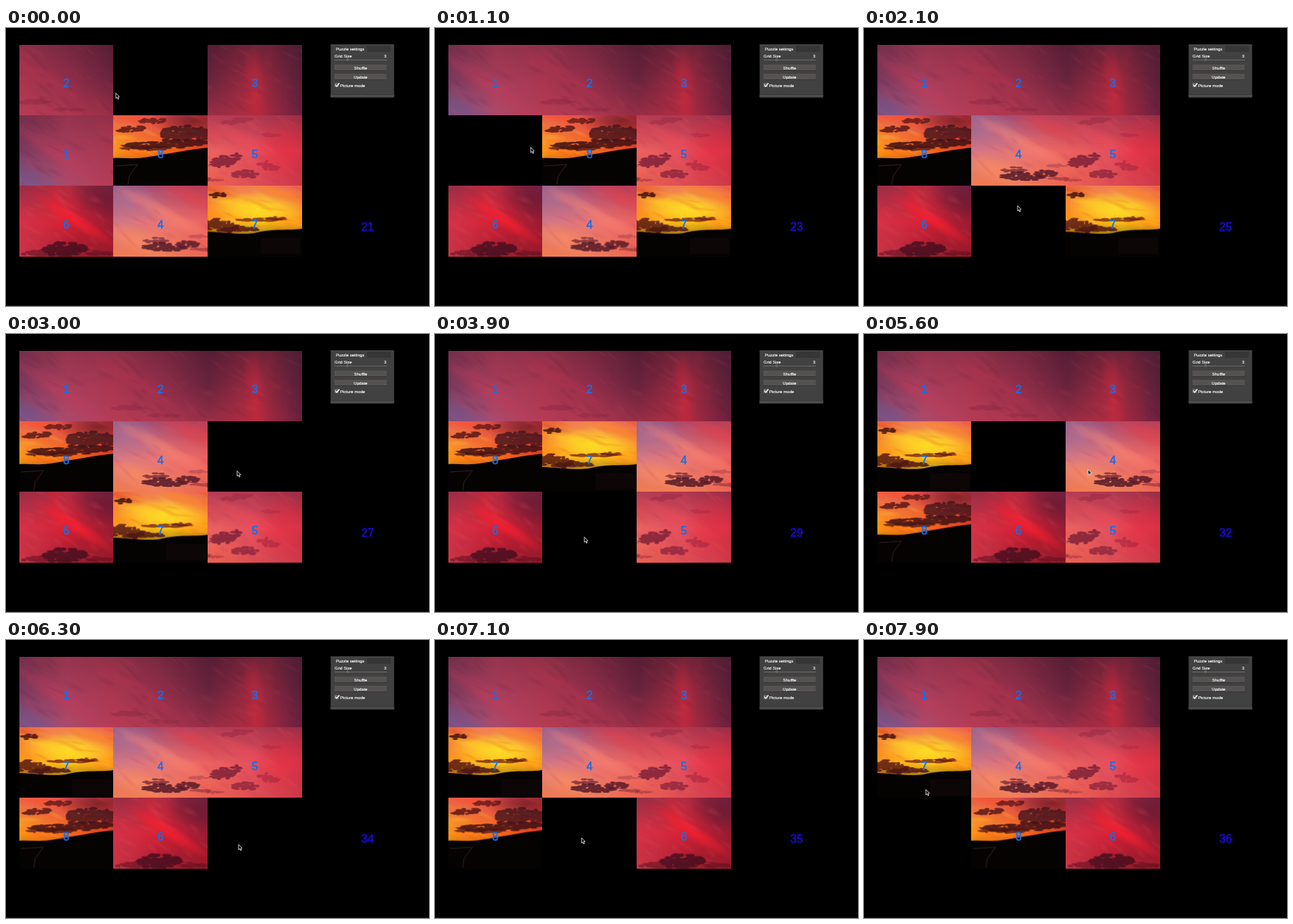
An HTML page with a canvas for the animation above (8000 ms loop, 600 by 395 pixels).

```html
<!DOCTYPE html>
<html lang="en">
<head>
<meta charset="utf-8">
<title>Sliding puzzle</title>
<style>
  html, body { margin: 0; width: 100%; height: 100%; overflow: hidden; background: #000; }
  canvas { display: block; width: 600px; height: 395px; }
</style>
</head>
<body>
<canvas id="stage" width="600" height="395"></canvas>
<script>
const LOOP = 8000, STEP = 100;
const COLS = [18.5, 152, 286, 419.5], ROWS = [23.5, 124, 224, 324.5];
const TW = 400 / 3, TH = 100;
const FONT = '"Liberation Sans", Arial, sans-serif';
const ctx = document.getElementById('stage').getContext('2d');

// Tile number in each cell, 0 is the hole
const START = [2, 0, 3, 1, 8, 5, 6, 4, 7];
const FIRST_COUNT = 21;
// [time, tile that slides into the hole]
const MOVES = [
  [500, 2], [1000, 1], [1500, 8], [2000, 4], [2500, 7], [2900, 5], [3400, 4], [3800, 7],
  [4300, 6], [4700, 8], [5200, 7], [5700, 4], [6200, 5], [6900, 6], [7500, 8]
];
// Pointer tip: [time, x, y]
const PATH = [
  [0, 156, 92], [400, 118, 96], [600, 118, 100], [900, 134, 160], [1100, 136, 169],
  [1400, 190, 188], [1600, 200, 196], [1900, 216, 246], [2100, 218, 252],
  [2400, 318, 262], [2600, 326, 258], [2850, 334, 198], [3000, 328, 194],
  [3300, 246, 188], [3500, 236, 196], [3750, 214, 274], [3900, 212, 288],
  [4200, 126, 286], [4400, 116, 274], [4650, 122, 202], [4900, 175, 203],
  [5200, 204, 200], [5600, 318, 192], [5800, 328, 204], [6100, 332, 276],
  [6300, 330, 290], [6500, 322, 288], [6850, 240, 282], [7050, 224, 282],
  [7400, 112, 272], [7600, 104, 262], [7900, 88, 212]
];

function makeRandom(seed) {
  return () => (seed = (seed * 16807) % 2147483647) / 2147483647;
}

function makeCanvas(w, h) {
  const c = document.createElement('canvas');
  c.width = w;
  c.height = h;
  return c;
}

function paintSunset() {
  const pic = makeCanvas(400, 300), g = pic.getContext('2d');
  const rnd = makeRandom(4711);

  // Coarse sky colours, one row every 50px, smoothed when enlarged
  const sky = [
    '#74304a #96344e #8e3048 #762840 #561e34 #74243a #4c1e34',
    '#7c3a60 #a83e5c #aa3650 #922e4a #6a243e #a22a40 #542038',
    '#8a5c88 #ac4a6c #b63c54 #b03850 #982e46 #b42c40 #6a2040',
    '#d0788a #ea7674 #ec6260 #e44e5c #d83448 #d42034 #941c32',
    '#f47c4c #f07e58 #ec6450 #dc4c54 #cc3848 #9c1c30 #9c1828',
    '#ff9814 #ffc818 #ffa018 #fa6c18 #e03a18 #9a2018 #702020',
    '#000 #000 #000 #000 #000 #000 #000'
  ];
  const tiny = makeCanvas(7, 7), tg = tiny.getContext('2d');
  sky.forEach((row, y) => row.split(' ').forEach((col, x) => {
    tg.fillStyle = col;
    tg.fillRect(x, y, 1, 1);
  }));
  g.drawImage(tiny, -200 / 6, -25, 2800 / 6, 350);

  function glow(x, y, rx, ry, deg, rgb, a) {
    g.save();
    g.translate(x, y);
    g.rotate(deg * Math.PI / 180);
    g.scale(rx, ry);
    const f = g.createRadialGradient(0, 0, 0, 0, 0, 1);
    f.addColorStop(0, `rgba(${rgb},${a})`);
    f.addColorStop(0.5, `rgba(${rgb},${a * 0.55})`);
    f.addColorStop(1, `rgba(${rgb},0)`);
    g.fillStyle = f;
    g.fillRect(-1, -1, 2, 2);
    g.restore();
  }

  // Soft ragged bank of small flat puffs, denser towards its centre line
  function cloud(x, y, w, h, rgb, a, tilt = 0) {
    const n = 14 + w * h / 14;
    g.filter = 'blur(0.7px)';
    g.fillStyle = `rgba(${rgb},${a})`;
    g.beginPath();
    for (let i = 0; i < n; i++) {
      const u = rnd() * 2 - 1;
      const v = (rnd() + rnd() - 1) * Math.sqrt(1 - u * u);
      const rx = 2 + rnd() * (1 + w * 0.07), ry = 0.8 + rnd() * h * 0.1;
      const px = x + u * w / 2, py = y + v * h / 2 + u * tilt;
      g.moveTo(px + rx, py);
      g.ellipse(px, py, rx, ry, 0, 0, 7);
    }
    g.fill();
    g.filter = 'none';
  }

  // Fine wisps that follow the drift of the sky
  function wisps(n, y0, h, deg, colors, a) {
    for (let i = 0; i < n; i++) {
      const x = rnd() * 400, y = y0 + rnd() * h;
      glow(x, y, 8 + rnd() * 16, 2 + rnd() * 3, deg + rnd() * 25, colors[i % colors.length], a);
    }
  }

  function clipRow(i, draw) {
    g.save();
    g.beginPath();
    g.rect(0, i * TH, 400, TH);
    g.clip();
    draw();
    g.restore();
  }

  clipRow(0, () => {
    glow(60, 58, 95, 16, 34, '196,60,90', 0.5);
    glow(16, 92, 55, 20, 22, '106,80,140', 0.5);
    glow(160, 40, 80, 14, 32, '186,52,80', 0.4);
    glow(334, 62, 18, 60, -6, '206,40,60', 0.55);
    glow(352, 35, 12, 50, 8, '150,40,60', 0.35);
    wisps(90, 0, 100, 20, ['210,66,92', '76,24,56'], 0.13);
    cloud(155, 81, 46, 9, '120,32,60', 0.3);
    cloud(205, 92, 40, 7, '120,32,60', 0.25);
  });

  clipRow(1, () => {
    glow(30, 118, 60, 24, 25, '180,120,160', 0.55);
    glow(75, 140, 90, 14, 28, '255,136,112', 0.55);
    glow(30, 175, 60, 20, 18, '255,146,100', 0.6);
    glow(110, 115, 55, 16, 25, '232,62,74', 0.55);
    glow(195, 140, 65, 14, 25, '246,76,90', 0.45);
    glow(240, 150, 40, 50, 20, '228,40,60', 0.5);
    glow(345, 148, 75, 12, 32, '255,32,48', 0.75);
    glow(320, 125, 14, 45, -12, '232,36,54', 0.45);
    glow(380, 118, 42, 26, 30, '90,22,46', 0.5);
    glow(280, 175, 40, 30, 0, '196,44,64', 0.5);
    wisps(90, 100, 100, 20, ['250,90,96', '180,50,90'], 0.14);
    cloud(174, 108, 40, 10, '150,40,66', 0.5, -3);
    cloud(222, 128, 26, 6, '166,40,66', 0.45);
    cloud(159, 163, 40, 20, '112,26,52', 0.75, -4);
    cloud(186, 184, 36, 13, '122,28,54', 0.65);
    cloud(220, 172, 28, 14, '160,36,62', 0.55, 3);
    cloud(142, 192, 20, 5, '150,40,62', 0.5);
    cloud(122, 172, 26, 5, '166,60,80', 0.5);
    cloud(60, 178, 30, 9, '106,32,50', 0.7);
    cloud(72, 187, 58, 14, '72,18,36', 0.8);
    cloud(105, 183, 30, 12, '80,20,38', 0.8);
    cloud(124, 190, 26, 5, '140,48,62', 0.6);
    cloud(332, 190, 58, 24, '64,14,30', 0.8);
    cloud(292, 196, 40, 10, '96,18,36', 0.6);
    cloud(380, 196, 34, 10, '90,16,32', 0.6);
  });

  clipRow(2, () => {
    glow(72, 232, 70, 22, 4, '255,232,36', 0.9);
    glow(30, 222, 60, 8, 16, '255,200,36', 0.7);
    glow(100, 210, 60, 10, 18, '255,140,40', 0.6);
    glow(8, 207, 40, 14, 10, '224,76,40', 0.7);
    glow(118, 252, 40, 10, 0, '255,150,20', 0.6);
    glow(160, 252, 46, 14, 0, '255,120,24', 0.7);
    glow(170, 206, 60, 8, 8, '255,80,36', 0.6);
    glow(245, 208, 60, 24, 0, '96,24,32', 0.7);
    wisps(50, 200, 60, 5, ['255,220,50', '236,70,24'], 0.22);
    cloud(14, 213, 20, 9, '64,18,14', 0.85);
    cloud(16, 256, 54, 20, '88,28,22', 0.85, 4);
    cloud(46, 262, 46, 12, '80,24,20', 0.85);
    cloud(74, 248, 66, 6, '120,40,18', 0.8);
    cloud(97, 246, 24, 5, '100,32,20', 0.75);
    cloud(160, 220, 36, 11, '80,18,20', 0.8, -2);
    cloud(190, 208, 36, 9, '84,20,24', 0.75);
    cloud(208, 241, 112, 15, '62,16,22', 0.85, -2);
    cloud(236, 226, 66, 26, '66,20,28', 0.8);
    cloud(180, 247, 66, 7, '74,20,22', 0.75);
  });

  // Hills
  g.fillStyle = '#050202';
  g.beginPath();
  g.moveTo(0, 265);
  g.bezierCurveTo(25, 266, 50, 270, 66, 267);
  g.bezierCurveTo(95, 260, 115, 264, 133, 261);
  g.bezierCurveTo(150, 260, 165, 263, 184, 259);
  g.bezierCurveTo(215, 254, 240, 249, 267, 246);
  g.lineTo(400, 246);
  g.lineTo(400, 300);
  g.lineTo(0, 300);
  g.fill();
  g.fillStyle = '#0d0606';
  g.fillRect(75, 274, 56, 23);
  g.strokeStyle = '#352426';
  g.lineWidth = 1;
  g.beginPath();
  g.moveTo(136, 272);
  g.lineTo(168, 270);
  g.lineTo(156, 286);
  g.lineTo(154, 299);
  g.stroke();
  return pic;
}

function text(str, x, y, size, color, align, weight) {
  ctx.font = `${size}px ${FONT}`;
  ctx.textAlign = align;
  ctx.fillStyle = ctx.strokeStyle = color;
  ctx.lineWidth = weight;
  ctx.fillText(str, x, y);
  ctx.strokeText(str, x, y);
}

function box(x, y, w, h, color) {
  ctx.fillStyle = color;
  ctx.fillRect(x, y, w, h);
}

function drawPanel() {
  const label = (s, x, y, align = 'left') => text(s, x, y, 6, '#fff', align, 0.15);
  box(460.5, 23.5, 90, 75, '#414141');
  box(460.5, 23.5, 90, 1, '#505050');
  box(512, 25, 34, 9, '#363636');
  label('Puzzle settings', 468, 32);
  label('Grid Size', 466, 42);
  label('3', 539.5, 42, 'right');
  box(466, 45, 74, 1, '#6c6c6c');
  box(483, 43, 3, 4, '#626262');
  for (const [name, y] of [['Shuffle', 52], ['Update', 65]]) {
    box(466, y, 74, 9, '#353535');
    box(466, y, 74, 8, '#565252');
    label(name, 503, y + 6.6, 'center');
  }
  box(466, 78, 6, 6, '#6c6c6c');
  ctx.strokeStyle = '#fff';
  ctx.lineWidth = 1.2;
  ctx.beginPath();
  ctx.moveTo(467, 80.5);
  ctx.lineTo(469, 83);
  ctx.lineTo(473, 78.5);
  ctx.stroke();
  label('Picture mode', 474, 83.6);
  box(460.5, 94, 90, 1, '#363636');
  box(460.5, 95, 90, 3.5, '#4c4c4c');
}

function drawPointer(t) {
  let i = 0;
  while (i < PATH.length - 2 && PATH[i + 1][0] <= t) i++;
  const [t0, x0, y0] = PATH[i], [t1, x1, y1] = PATH[i + 1];
  const k = Math.min(1, (t - t0) / (t1 - t0));
  ctx.save();
  ctx.translate(x0 + (x1 - x0) * k - 0.6, y0 + (y1 - y0) * k);
  ctx.beginPath();
  ctx.moveTo(0.5, 0.5);
  ctx.lineTo(0.5, 8);
  ctx.lineTo(2.1, 6.5);
  ctx.lineTo(3.4, 9.2);
  ctx.lineTo(4.6, 8.6);
  ctx.lineTo(3.4, 6);
  ctx.lineTo(5.5, 5.8);
  ctx.closePath();
  ctx.fillStyle = '#000';
  ctx.fill();
  ctx.strokeStyle = '#e8e8e8';
  ctx.lineWidth = 0.9;
  ctx.stroke();
  ctx.restore();
}

const sunset = paintSunset();

function draw(t) {
  const cells = START.slice();
  let count = FIRST_COUNT;
  for (const [at, tile] of MOVES) {
    if (t < at) break;
    const from = cells.indexOf(tile), to = cells.indexOf(0);
    cells[to] = tile;
    cells[from] = 0;
    count++;
  }

  box(0, 0, 600, 395, '#000');
  box(0, 394, 600, 1, '#141414');
  cells.forEach((n, i) => {
    if (!n) return;
    const col = i % 3, row = Math.floor(i / 3);
    const x = COLS[col], y = ROWS[row], w = COLS[col + 1] - x, h = ROWS[row + 1] - y;
    const sx = (n - 1) % 3 * TW, sy = Math.floor((n - 1) / 3) * TH;
    ctx.drawImage(sunset, sx, sy, TW, TH, x, y, w, h);
    text(n, x + w / 2 + 0.2, y + 60.5, 16, '#1670e8', 'center', 0.6);
  });
  text(count, 513, 288.2, 16, '#1c08d4', 'center', 0.6);
  drawPanel();
  drawPointer(t);
}

function frame() {
  const t = performance.now() % LOOP;
  draw(Math.floor(t / STEP) * STEP);
  requestAnimationFrame(frame);
}
frame();
</script>
</body>
</html>
```
